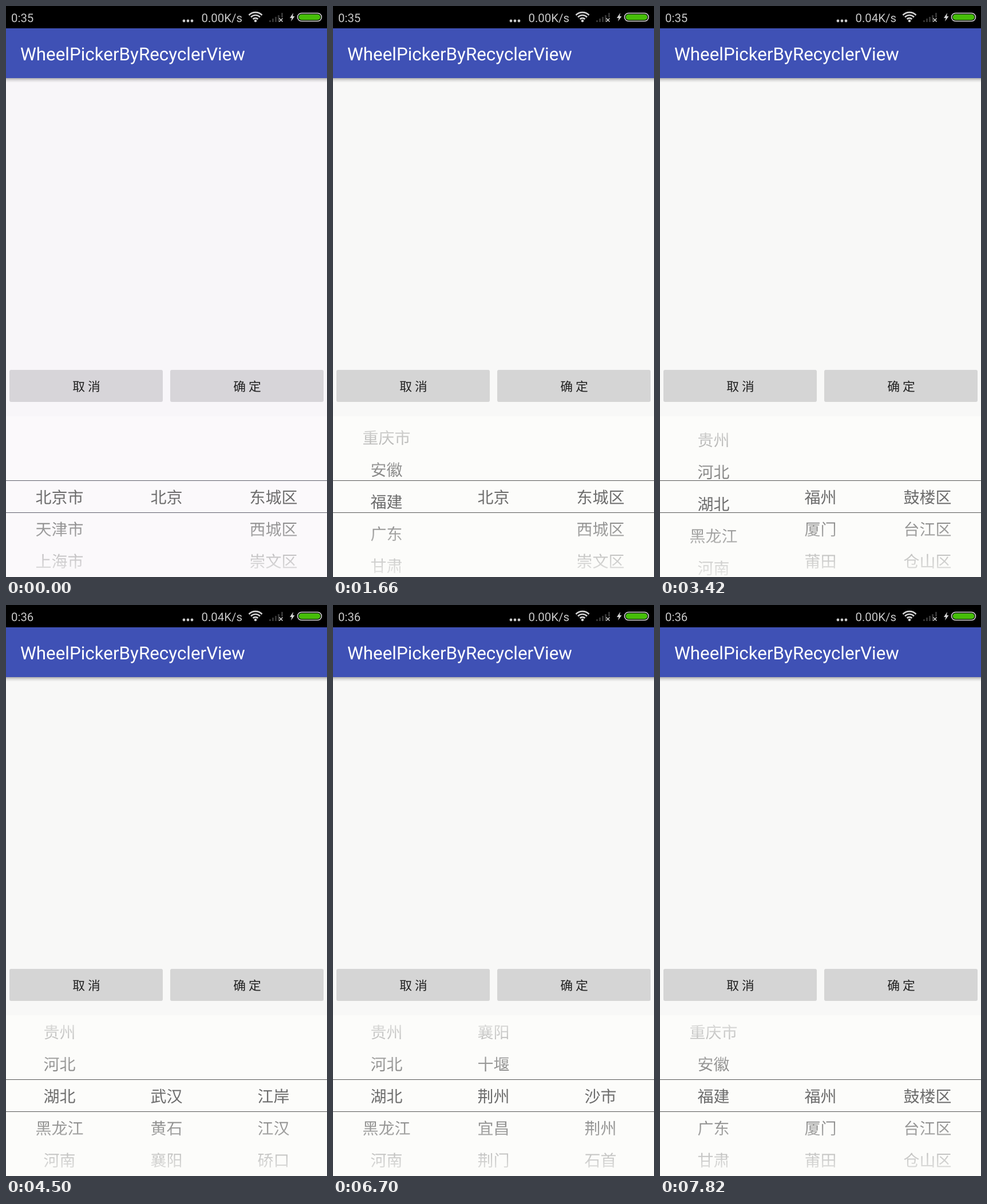
Recreate the animation shown at these times as an HTML page. Size 561 by 998 pixels, loop 8 s.

```html
<!DOCTYPE html>
<html lang="zh-CN">
<head>
<meta charset="utf-8">
<title>WheelPickerByRecyclerView</title>
<style>
  html, body { margin: 0; width: 100%; height: 100%; overflow: hidden; background: #f8f8f7; }
  svg { display: block; width: 561px; height: 998px; }
  text { white-space: pre; text-rendering: geometricPrecision; }
  .latin { font-family: Roboto, "Noto Sans", sans-serif; }
  .status { font-size: 20.4px; fill: #c8c8c8; }
  .title { font-size: 31.35px; fill: #fff; }
  .cjk { font-family: "Noto Sans CJK SC", "Noto Sans CJK", sans-serif; text-anchor: middle; }
  .label { font-size: 21.8px; font-weight: 500; fill: #202020; }
  .item { font-size: 28px; fill: #6c6c6c; }
  .page { fill: #f8f8f7; }
  .panel { fill: #fcfcfa; }
  .button { fill: #d5d5d5; }
  .fade { stop-color: #fcfcfa; }
  .line { fill: #585858; }
  .tinted .page { fill: #f8f6f9; }
  .tinted .panel { fill: #fbf9fb; }
  .tinted .button { fill: #d7d5d9; }
  .tinted .fade { stop-color: #fbf9fb; }
  .tinted .line { fill: #60606c; }
</style>
</head>
<body>
<svg id="stage" viewBox="0 0 561 998">
  <defs>
    <linearGradient id="down" x1="0" y1="0" x2="0" y2="1">
      <stop class="fade" offset="0" stop-opacity=".12"/>
      <stop class="fade" offset="1" stop-opacity=".87"/>
    </linearGradient>
    <linearGradient id="up" x1="0" y1="1" x2="0" y2="0">
      <stop class="fade" offset="0" stop-opacity=".12"/>
      <stop class="fade" offset="1" stop-opacity=".87"/>
    </linearGradient>
    <linearGradient id="shadow" x1="0" y1="0" x2="0" y2="1">
      <stop offset="0" stop-opacity=".3"/>
      <stop offset=".5" stop-opacity=".1"/>
      <stop offset="1" stop-opacity="0"/>
    </linearGradient>
    <clipPath id="window"><rect y="717" width="561" height="281"/></clipPath>
  </defs>

  <rect class="page" width="561" height="998"/>

  <!-- status bar -->
  <rect width="561" height="39" fill="#000"/>
  <text id="clock" class="latin status" x="9" y="28"></text>
  <g fill="#c8c8c8">
    <circle cx="311" cy="26" r="2.4"/>
    <circle cx="318" cy="26" r="2.4"/>
    <circle cx="325" cy="26" r="2.4"/>
  </g>
  <text id="speed" class="latin status" x="341.5" y="28"></text>
  <g fill="none" stroke="#d0d0d0" stroke-width="2.6">
    <path d="M424.5 16A16 16 0 0 1 447.5 16"/>
    <path d="M428 19.500A11 11 0 0 1 444 19.500"/>
    <path d="M431.600 23A6 6 0 0 1 440.400 23"/>
  </g>
  <circle cx="436" cy="26" r="2.300" fill="#d0d0d0"/>
  <path d="M461.500 28v-3M466.500 28v-6M471.500 28v-9M476.500 28v-12M482.500 20v-8" stroke="#343434" stroke-width="3"/>
  <path d="M477.500 21.500l6 6m0-6l-6 6" stroke="#d0d0d0" stroke-width="1.500"/>
  <path d="M502 12l-6 9h3.500l-1.500 6 6.500-9h-3.500z" fill="#d8d8d8"/>
  <rect x="509.500" y="12.500" width="42" height="14" rx="7" fill="none" stroke="#d6d6d6" stroke-width="1.600"/>
  <rect x="511.500" y="14.500" width="38" height="10" rx="5" fill="#46be08"/>

  <!-- toolbar -->
  <rect y="126" width="561" height="8" fill="url(#shadow)"/>
  <rect y="39" width="561" height="87" fill="#3f51b5"/>
  <text class="latin title" x="25" y="95">WheelPickerByRecyclerView</text>

  <!-- buttons -->
  <rect class="button" x="6" y="636" width="268" height="56" rx="3"/>
  <rect class="button" x="287" y="636" width="268" height="56" rx="3"/>
  <text class="cjk label" x="140.500" y="673">取 消</text>
  <text class="cjk label" x="421.500" y="673">确 定</text>

  <!-- wheels -->
  <rect class="panel" y="717" width="561" height="281"/>
  <g id="wheels" clip-path="url(#window)"></g>
  <rect y="717" width="561" height="112" fill="url(#up)"/>
  <rect y="886" width="561" height="112" fill="url(#down)"/>
  <rect class="line" y="829" width="561" height="1"/>
  <rect class="line" y="885" width="561" height="1"/>
</svg>
<script>
const LOOP = 8000, STEP = 40, ROW = 56, BASELINE = 868.5;
const $ = id => document.getElementById(id);
const words = s => s.split(' ');

const provinces = words('北京市 天津市 上海市 重庆市 安徽 福建 广东 甘肃 广西 贵州 河北 湖北 黑龙江 河南 湖南 吉林');
const beijing = [words('北京'), words('东城区 西城区 崇文区 宣武区')];
const fujian = [words('福州 厦门 莆田 三明'), words('鼓楼区 台江区 仓山区 马尾区')];
const hubeiCities = words('武汉 黄石 襄阳 十堰 荆州 宜昌 荆门 鄂州');
const wuhan = [hubeiCities, words('江岸 江汉 硚口 汉阳')];
const jingzhou = [hubeiCities, words('沙市 荆州 石首 洪湖')];

// Lists shown by the second and third wheel, by start time
const choices = [[0, beijing], [2020, fujian], [3740, wuhan], [6060, jingzhou], [7820, fujian]];

const flings = [
  { wheel: 0, start: 980, length: 1000, from: 0, to: 5, power: 3.04 },
  { wheel: 0, start: 2700, length: 1000, from: 5, to: 11, power: 2.555 },
  { wheel: 1, start: 5100, length: 920, from: 0, to: 4, power: 3.15 },
  { wheel: 0, start: 6860, length: 920, from: 11, to: 5, power: 2.9 }
];

const wheels = [0, 1, 2].map(i => {
  const g = document.createElementNS('http://www.w3.org/2000/svg', 'g');
  $('wheels').append(g);
  return { g, x: 561 * (i + 0.5) / 3, list: null };
});

function show(wheel, list) {
  if (wheel.list === list) return;
  wheel.list = list;
  wheel.g.innerHTML = list.map((name, i) =>
    `<text class="cjk item" x="${wheel.x}" y="${BASELINE + i * ROW}">${name}</text>`).join('');
}

function position(wheel, t) {
  let pos = 0;
  for (const f of flings) {
    if (f.wheel !== wheel || t < f.start) continue;
    const left = Math.max(0, 1 - (t - f.start) / f.length);
    pos = f.to + (f.from - f.to) * left ** f.power;
  }
  // The city wheel returns to the top with a new province
  return wheel === 1 && t >= 7820 ? 0 : pos;
}

function setText(id, value) {
  if ($(id).textContent !== value) $(id).textContent = value;
}

function draw(now) {
  const t = now % LOOP;
  const tick = Math.floor((t - 20) / STEP) * STEP + 20;
  const [cities, districts] = choices.filter(c => t >= c[0]).pop()[1];
  [provinces, cities, districts].forEach((list, i) => {
    show(wheels[i], list);
    wheels[i].g.setAttribute('transform', `translate(0 ${-position(i, tick) * ROW})`);
  });
  setText('clock', t < 4500 ? '0:35' : '0:36');
  setText('speed', t >= 2660 && t < 6700 ? '0.04K/s' : '0.00K/s');
  $('stage').classList.toggle('tinted', t < 500);
}

function frame() {
  draw(performance.now());
  requestAnimationFrame(frame);
}
frame();
</script>
</body>
</html>
```
